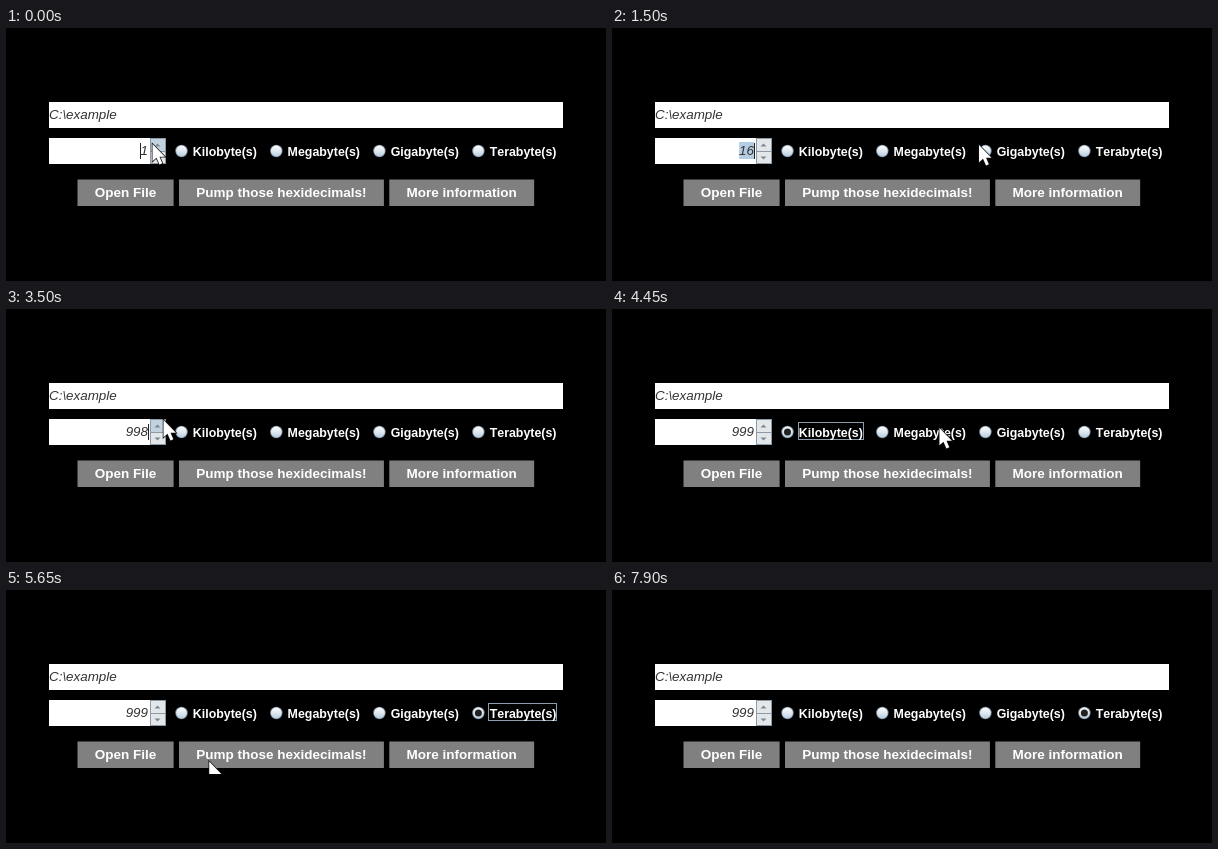
An HTML page with a canvas for the animation above (8 s loop, 600 by 253 pixels).

```html
<!DOCTYPE html>
<html lang="en">
<head>
<meta charset="utf-8">
<title>File pumper</title>
<style>
  html, body { margin: 0; width: 100%; height: 100%; overflow: hidden; background: #000; }
  canvas { display: block; }
</style>
</head>
<body>
<canvas id="stage" width="600" height="253"></canvas>
<script>
const ctx = document.getElementById('stage').getContext('2d');
ctx.fontKerning = 'none';

const LOOP = 8000, TICK = 50, GLIDE = 350;
const FAMILY = '"Liberation Sans", Arial, sans-serif';
const FIELD_FONT = `italic 13.4px ${FAMILY}`;
const LABEL_FONT = `bold 12.4px ${FAMILY}`;
const BUTTON_FONT = `bold 13.5px ${FAMILY}`;
const INK = '#333', WHITE = '#fff';

// Moments of the interaction
const COUNT = 250, DRAG = 1350, BLINK = 1900, TYPE = 2100, STEP_UP = 3650;
const PICK_KILO = 3950, PICK_TERA = 4800, BLUR = 6000;

const spots = {
  spinner: { x: 146, y: 116 },
  field: { x: 112, y: 117 },
  idle: { x: 401, y: 117 },
  arrowUp: { x: 157, y: 111 },
  kilobyte: { x: 174, y: 119 },
  terabyte: { x: 519, y: 119 },
  pump: { x: 200, y: 172 },
  open: { x: 73, y: 165 },
  openEnd: { x: 174, y: 162 },
  openCorner: { x: 73, y: 152 },
  above: { x: 74, y: 123 },
  outside: { x: -25, y: 101 }
};
const moves = [
  [1050, 'field'], [DRAG, 'idle'], [2900, 'arrowUp'], [3750, 'kilobyte'],
  [4400, 'terabyte'], [5400, 'pump'], [5750, 'open'], [6100, 'openEnd'],
  [6450, 'openCorner'], [6800, 'above'], [7700, 'outside']
];
const arrow = [[0, 0], [0, 17.3], [4, 13.8], [7, 20.4], [9.8, 19.2], [7, 12.8], [12.4, 12.8]];

const easeOut = k => 1 - (1 - Math.min(1, Math.max(0, k))) ** 3.8;

function rect(x, y, w, h, color) {
  ctx.fillStyle = color;
  ctx.fillRect(x, y, w, h);
}

function text(string, x, y, font, color, align = 'left') {
  ctx.font = font;
  ctx.fillStyle = color;
  ctx.textAlign = align;
  ctx.fillText(string, x, y);
}

function textWidth(string, font) {
  ctx.font = font;
  return ctx.measureText(string).width;
}

function polygon(points, x, y, color, outline) {
  ctx.beginPath();
  points.forEach(([px, py]) => ctx.lineTo(x + px, y + py));
  ctx.closePath();
  if (outline) {
    ctx.strokeStyle = outline;
    ctx.lineWidth = 1.5;
    ctx.stroke();
  }
  ctx.fillStyle = color;
  ctx.fill();
}

function circle(x, y, r, color) {
  ctx.beginPath();
  ctx.arc(x, y, r, 0, Math.PI * 2);
  ctx.fillStyle = color;
  ctx.fill();
}

function pointerAt(t) {
  return moves.reduce(({ x, y }, [start, name]) => {
    const k = easeOut((t - start) / GLIDE), goal = spots[name];
    return { x: x + (goal.x - x) * k, y: y + (goal.y - y) * k };
  }, spots.spinner);
}

function valueAt(t) {
  if (t < COUNT) return '1';
  if (t < TYPE) return String(Math.min(16, 2 + Math.floor((t - COUNT) / 55)));
  return t < STEP_UP ? '998'.slice(0, 1 + Math.floor((t - TYPE) / 200)) : '999';
}

function drawSpinner(t, pointer) {
  const value = valueAt(t), right = 142;
  const left = right - textWidth(value, FIELD_FONT);
  rect(43, 110, 101, 26, WHITE);
  if (t >= DRAG && t < TYPE) rect(left, 114, Math.min(pointer.x, right) - left, 17, '#b5cde2');
  text(value, right, 127, FIELD_FONT, INK, 'right');
  const blinkOff = t >= BLINK && t < TYPE;
  if (t < PICK_KILO && !blinkOff) rect(t < DRAG ? Math.round(left) - 1 : right, 115, 1, 16, '#222');

  const hover = pointer.x > 143 && pointer.x < 161 && pointer.y < 124;
  rect(144, 110, 16, 26, '#8c9aa8');
  rect(145, 111, 14, 12, hover ? '#c3d2df' : '#e4e7ea');
  rect(145, 124, 14, 11, '#e4e7ea');
  polygon([[0, 3], [3, 0], [6, 3]], 148.5, 115.5, '#808891');
  polygon([[0, 0], [6, 0], [3, 3]], 148.5, 128.5, '#808891');
}

function drawRadios(t) {
  const selected = t < PICK_KILO ? '' : t < PICK_TERA ? 'Kilobyte(s)' : 'Terabyte(s)';
  const y = 123, shade = ctx.createLinearGradient(0, y - 6, 0, y + 6);
  shade.addColorStop(0, WHITE);
  shade.addColorStop(0.45, '#e3ebf2');
  shade.addColorStop(1, '#b5cbdf');
  let x = 175.5;
  for (const unit of ['Kilo', 'Mega', 'Giga', 'Tera']) {
    const label = unit + 'byte(s)', width = textWidth(label, LABEL_FONT);
    circle(x, y, 6.2, '#8193a4');
    circle(x, y, 5.4, shade);
    if (label === selected) {
      circle(x, y, 3.5, '#222');
      if (t < BLUR) {
        ctx.strokeStyle = '#8c9dad';
        ctx.lineWidth = 1;
        ctx.strokeRect(Math.round(x) + 10.5, 113.5, Math.round(width) + 1, 17);
      }
    }
    text(label, x + 11.3, 127.5, LABEL_FONT, WHITE);
    x += width + 30.8;
  }
}

function drawButtons() {
  let x = 71.5;
  for (const label of ['Open File', 'Pump those hexidecimals!', 'More information']) {
    const width = textWidth(label, BUTTON_FONT) + 34.6;
    rect(x, 151.5, width, 26.5, '#808080');
    text(label, x + width / 2, 169, BUTTON_FONT, WHITE, 'center');
    x += width + 5.4;
  }
}

function drawPointer(t, { x, y }) {
  if (t > 1100 && t <= DRAG) {
    rect(x, 111, 1, 16, '#222');
    for (const end of [110, 127]) rect(x - 3, end, 7, 1, '#222');
    return;
  }
  ctx.save();
  ctx.beginPath();
  ctx.rect(0, 0, 600, 184);
  ctx.clip();
  polygon(arrow, x + 0.5, y, WHITE, '#111');
  ctx.restore();
}

function draw(t) {
  const pointer = pointerAt(t);
  rect(0, 0, 600, 253, '#000');
  rect(43, 74, 514, 26, WHITE);
  text('C:\\example', 43, 91, FIELD_FONT, INK);
  drawSpinner(t, pointer);
  drawRadios(t);
  drawButtons();
  drawPointer(t, pointer);
}

const begin = performance.now();
function frame() {
  const t = (performance.now() - begin) % LOOP;
  draw(Math.floor(t / TICK) * TICK);
  requestAnimationFrame(frame);
}
frame();
</script>
</body>
</html>
```
